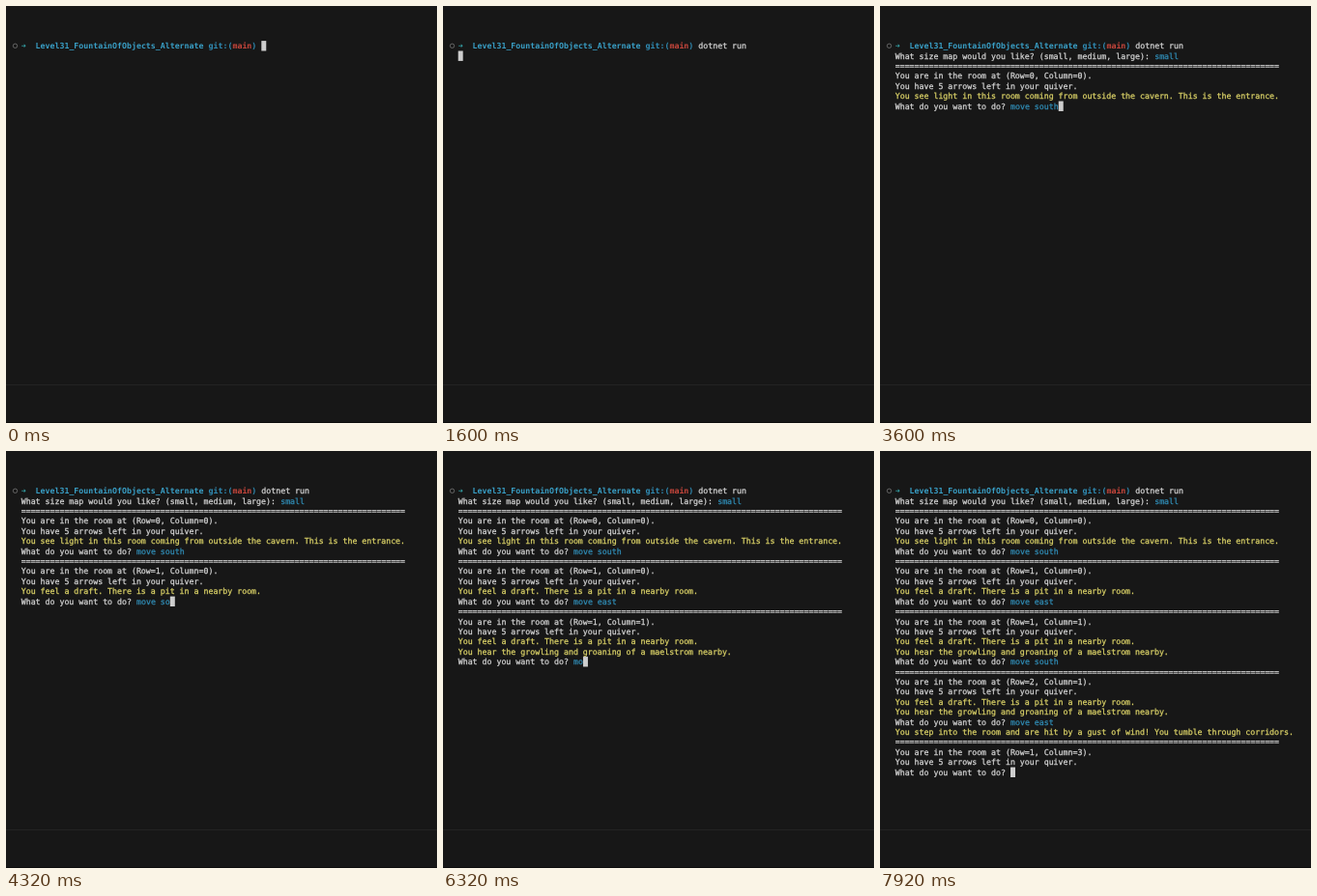
An HTML page with a canvas that plays this animation: 446x432 px, repeating every 8 s.

```html
<!DOCTYPE html>
<html lang="en">
<head>
<meta charset="utf-8">
<style>
  html, body { margin: 0; height: 100%; overflow: hidden; background: #171717; }
  canvas { display: block; filter: blur(0.4px); }
</style>
</head>
<body>
<canvas id="screen" width="446" height="432"></canvas>
<script>
const LOOP = 8000, LEFT = 15.7, TOP = 36.1, CELL = 4.972, LINE = 10.41;
const WHITE = '#d6d6d6', YELLOW = '#ddd468', BLUE = '#308db6', PATH = '#399fc6', RED = '#c8463c';
const ctx = document.getElementById('screen').getContext('2d');

const RULE = '='.repeat(80);
const SIZE = 'What size map would you like? (small, medium, large): ';
const ASK = 'What do you want to do? ';
const LIGHT = 'You see light in this room coming from outside the cavern. This is the entrance.';
const DRAFT = 'You feel a draft. There is a pit in a nearby room.';
const GROWL = 'You hear the growling and groaning of a maelstrom nearby.';
const GUST = 'You step into the room and are hit by a gust of wind! You tumble through corridors.';
const HINTS = [LIGHT, DRAFT, GROWL, GUST];

const room = (row, column, ...senses) => [
  RULE,
  `You are in the room at (Row=${row}, Column=${column}).`,
  'You have 5 arrows left in your quiver.',
  ...senses
];

// A turn appears at `at`; its keys are pressed evenly between `from` and `to`.
// In `keys`, "·" is a pause of one beat and "<" is a backspace.
const turn = (at, lines, prompt, keys = '', from = 0, to = 0) => ({ at, lines, prompt, keys, from, to });
const turns = [
  turn(0, [], ' '.repeat(50), 'd·····ot·n·et run', 80, 1360),
  turn(1520, [], ''),
  turn(1920, [], SIZE, 'small', 2160, 2560),
  turn(2720, room(0, 0, LIGHT), ASK, 'move south', 3040, 3600),
  turn(3680, room(1, 0, DRAFT), ASK, 'move so··u·t·h·······<<<<<east', 3920, 5805),
  turn(6080, room(1, 1, DRAFT, GROWL), ASK, 'move south', 6240, 6640),
  turn(6720, room(2, 1, DRAFT, GROWL), ASK, 'move east', 6800, 7280),
  turn(7360, [GUST, ...room(1, 3)], ASK)
];

function typed({ keys, from, to }, time) {
  const beat = (to - from) / (keys.length - 1);
  const pressed = time < from ? 0 : Math.floor((time - from) / beat) + 1;
  let text = '';
  for (const key of keys.slice(0, pressed)) {
    if (key === '<') text = text.slice(0, -1);
    else if (key !== '·') text += key;
  }
  return text;
}

function write(text, col, row, color, weight = 'normal') {
  const x = LEFT + col * CELL, y = TOP + row * LINE + 8.1;
  ctx.font = `${weight} 8.26px "DejaVu Sans Mono", monospace`;
  ctx.fillStyle = ctx.strokeStyle = color;
  ctx.fillText(text, x, y);
  if (weight === 'normal') ctx.strokeText(text, x, y);
}

function shellPrompt() {
  ctx.strokeStyle = '#777';
  ctx.lineWidth = 0.8;
  ctx.beginPath();
  ctx.arc(9.5, TOP + 5.2, 2.2, 0, 2 * Math.PI);
  ctx.stroke();
  write('➜', 0, 0, '#35a3a8', 'bold');
  write('Level31_FountainOfObjects_Alternate', 3, 0, PATH, 'bold');
  write('git:(', 39, 0, BLUE, 'bold');
  write('main', 44, 0, RED, 'bold');
  write(')', 48, 0, BLUE, 'bold');
}

function draw(time) {
  ctx.fillStyle = '#171717';
  ctx.fillRect(0, 0, 446, 432);
  ctx.fillStyle = '#232323';
  ctx.fillRect(0, 392, 446, 1);
  ctx.fillStyle = '#0c0c0c';
  ctx.fillRect(0, 431, 446, 1);

  shellPrompt();
  ctx.lineWidth = 0.25;
  let row = 0, col = 0;
  const shown = turns.filter(({ at }) => at <= time);
  shown.forEach((current, i) => {
    const { lines, prompt } = current;
    for (const line of lines) write(line, 0, row++, HINTS.includes(line) ? YELLOW : WHITE);
    const text = typed(current, time);
    write(prompt, 0, row, WHITE);
    write(text, prompt.length, row, i ? BLUE : WHITE);
    col = prompt.length + text.length;
    if (prompt && i < shown.length - 1) row++;
  });

  ctx.fillStyle = '#cdcdcd';
  ctx.fillRect(LEFT + col * CELL, TOP + row * LINE, CELL, LINE);
}

function tick(now) {
  draw(now % LOOP);
  requestAnimationFrame(tick);
}

ctx.textRendering = 'geometricPrecision';
draw(0);
requestAnimationFrame(tick);
</script>
</body>
</html>
```
